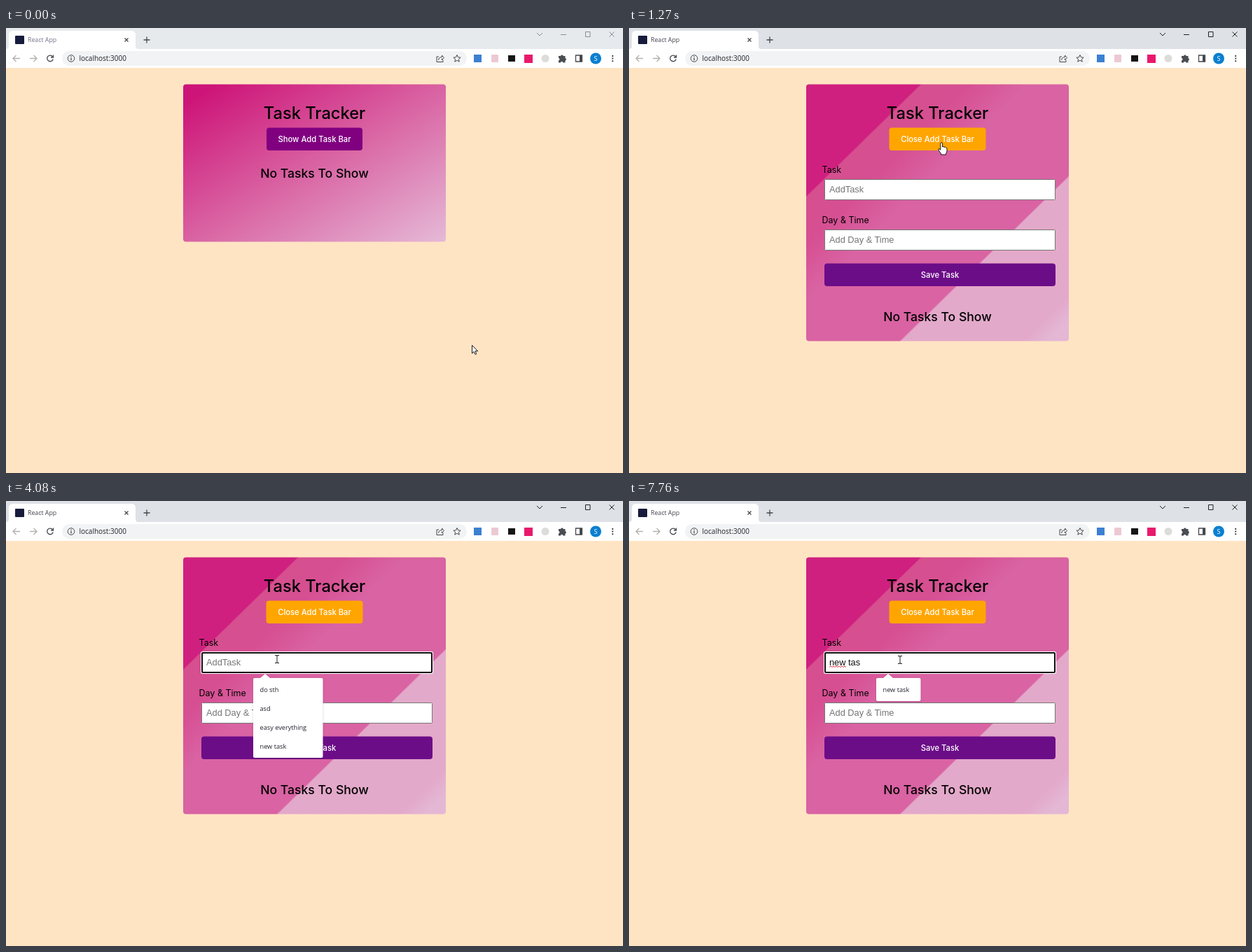
An HTML page for the animation above (8000 ms loop, 881x636 px).

```html
<!DOCTYPE html>
<html lang="en">
<head>
<meta charset="utf-8">
<title>Task Tracker</title>
<style>
html, body { margin: 0; width: 100%; height: 100%; overflow: hidden; background: #ffe4c4; }
svg { display: block; }
text { white-space: pre; }
.ui { font-family: "Open Sans", sans-serif; font-size: 9.2px; fill: #24202c; }
.app { font-family: Inter, sans-serif; font-weight: 500; text-anchor: middle; }
.label { font: 12.5px Inter, sans-serif; }
.btn { font-size: 11.25px; fill: #fff; }
.field { font: 12.8px "Liberation Sans", Arial, sans-serif; }
.hint { fill: #757575; }
.line { fill: none; stroke: #45484d; stroke-width: 1.3; }
.box { fill: #fff; stroke: #767676; }
.popup { filter: drop-shadow(0 1px 1px rgba(60, 20, 60, .25)); fill: #fff; }
.cursor { fill: #fff; stroke: #000; stroke-width: .9; stroke-linejoin: round; }
</style>
</head>
<body>
<svg width="881" height="636" viewBox="0 0 881 636">
  <defs>
    <linearGradient id="smooth" x1="0" y1="0" x2="1" y2="1">
      <stop offset=".06" stop-color="#cd1478"/>
      <stop offset=".5" stop-color="#d962a2"/>
      <stop offset="1" stop-color="#e5b9d7"/>
    </linearGradient>
    <linearGradient id="banded" x1="0" y1="0" x2="1" y2="1">
      <stop offset=".217" stop-color="#d0207f"/>
      <stop offset=".22" stop-color="#d64f8f"/>
      <stop offset=".31" stop-color="#d64f92"/>
      <stop offset=".42" stop-color="#d963a3"/>
      <stop offset=".677" stop-color="#d963a3"/>
      <stop offset=".681" stop-color="#e3a9ca"/>
      <stop offset=".91" stop-color="#e3a9ca"/>
      <stop offset=".96" stop-color="#e4b7d5"/>
    </linearGradient>
  </defs>

  <rect width="881" height="636" fill="#ffe4c4"/>

  <!-- browser window -->
  <rect id="titlebar" width="881" height="30"/>
  <path d="M0 30Q4 30 4 26V10Q4 4 10 4H179Q185 4 185 10V26Q185 30 189 30Z" fill="#fff"/>
  <rect y="30" width="881" height="27" fill="#fff"/>
  <rect x="13" y="11" width="13" height="12" rx="1" fill="#171c3c"/>
  <text id="tab" class="ui" x="31" y="20.3" style="font-size:8.8px">React App</text>
  <path class="line" d="M169.5 14.5l5 5m0-5l-5 5M196.500 17h9m-4.500-4.500v9"/>
  <path id="controls" fill="none" d="M758 7l4 4 4-4M792 9.500h8M827.500 5.500h6.500v7h-6.500ZM861.500 5.500l7 7m0-7l-7 7"/>

  <rect x="80" y="33" width="578" height="21" rx="10.500" fill="#f1f3f4"/>
  <path class="line" style="stroke:#b4b1ad" d="M20 43.500H10m4.500-4.500l-4.500 4.500 4.500 4.500M34 43.500h10m-4.500-4.500l4.500 4.500-4.500 4.500"/>
  <path class="line" d="M66.600 41A4.300 4.300 0 1 0 67.200 44.500M67.500 38.500V42H64"/>
  <circle class="line" cx="93" cy="43.500" r="4.800" style="stroke-width:1"/>
  <path class="line" d="M93 42.800v3.400M93 40.500v1.200"/>
  <text class="ui" x="104.500" y="47.200" style="font-size:10px">localhost:3000</text>
  <path class="line" style="stroke-width:1" d="M618 41H615v7.500h9V46M617.500 46q.5-4.500 5-4.500v-2.500l3 3.500-3 3.500v-2.500"/>
  <path class="line" style="stroke-width:1" d="M644 38.500l1.500 3.300 3.600.4-2.700 2.400.8 3.600-3.200-1.900-3.200 1.900.8-3.600-2.700-2.400 3.600-.4Z"/>
  <rect x="668" y="38" width="11" height="11" fill="#3c80d2"/>
  <rect x="693" y="38" width="10" height="11" rx="1" fill="#ecc9d3"/>
  <rect x="717" y="39" width="10" height="9" fill="#151515"/>
  <rect x="740" y="38" width="12" height="12" fill="#e8196c"/>
  <circle cx="770" cy="43.500" r="5.500" fill="#dcdcda"/>
  <path fill="#4a4d51" d="M789 40h3a1.900 1.900 0 0 1 3.700 0h2.800v3a1.900 1.900 0 0 1 0 3.700v2.800h-3a1.900 1.900 0 0 0-3.700 0H789v-3a1.900 1.900 0 0 0 0-3.700Z"/>
  <path class="line" d="M813.500 39h9v9h-9Z"/>
  <rect x="819" y="39" width="4" height="9" fill="#45484d"/>
  <circle cx="842" cy="43.500" r="8" fill="#0a7fd0"/>
  <text class="ui" x="842" y="46.800" text-anchor="middle" style="fill:#fff">S</text>
  <path fill="#45484d" d="M865.200 39h2v2h-2Zm0 3.600h2v2h-2Zm0 3.600h2v2h-2Z"/>

  <!-- card -->
  <rect id="card" x="253" y="80.500" width="375" rx="4"/>
  <text class="app" x="440.500" y="130" style="font-size:23.700px">Task Tracker</text>
  <g id="toggle">
    <rect id="toggleBox" y="142.500" height="32.500" rx="4"/>
    <text id="toggleText" class="app btn" x="440.500" y="163"></text>
  </g>
  <text id="empty" class="app" x="440.500" style="font-size:17.600px">No Tasks To Show</text>

  <g id="form">
    <text class="label" x="275.500" y="207.300">Task</text>
    <rect class="box" x="279.500" y="216.500" width="329" height="29" rx="1"/>
    <g id="focus">
      <rect x="278" y="215" width="332" height="32" rx="2.500" fill="#fff"/>
      <rect x="280" y="217" width="328" height="28" rx="1" fill="#fff" stroke="#101010" stroke-width="2"/>
    </g>
    <text id="typed" class="field" x="286" y="235"></text>
    <path id="spell" fill="none" stroke="#e0242c" stroke-width=".9"/>
    <rect id="caret" y="224" width="1" height="14.500"/>
    <text class="label" x="275.500" y="278.500">Day &amp; Time</text>
    <rect class="box" x="279.500" y="288.500" width="329" height="29" rx="1"/>
    <text class="field hint" x="286" y="306.500">Add Day &amp; Time</text>
    <rect x="279" y="336.500" width="330" height="32.500" rx="4" fill="#6c0d88"/>
    <text class="app btn" x="444" y="357">Save Task</text>
  </g>

  <g id="fullList">
    <path class="popup" d="M355 253h8l7-6 7 6h73.500q2 0 2 2v110q0 2-2 2H355q-2 0-2-2V255q0-2 2-2Z"/>
    <text class="ui" x="362.500" y="273.300">do sth</text>
    <text class="ui" x="362.500" y="300.300">asd</text>
    <text class="ui" x="362.500" y="327.300">easy everything</text>
    <text class="ui" x="362.500" y="354.300">new task</text>
  </g>
  <g id="shortList">
    <path class="popup" d="M355 253h8l7-6 7 6h37.500q2 0 2 2v29q0 2-2 2H355q-2 0-2-2V255q0-2 2-2Z"/>
    <text class="ui" x="362.500" y="273.300">new task</text>
  </g>

  <circle id="ripple" r="9" fill="#dfa022" opacity=".8"/>
  <g id="pointer">
    <path id="arrow" class="cursor" d="M.5.500V12L3.200 9.500 5 13.500 6.800 12.700 5 8.800H8.700Z"/>
    <path id="hand" class="cursor" d="M-1.200 1.200A1.400 1.400 0 0 1 1.600 1.200V6Q2.600 5 4 6.200 5.500 5.500 6.300 7 8 6.800 8 8.600V12Q7.600 14 6.500 15.500V17H-.5V15.500Q-2.500 13-4 10.500-4.800 8.500-3 8.700L-1.200 10.300Z"/>
    <path id="beam" fill="none" stroke="#222" d="M-3-5.500H-1Q0-5.500 0-4.500 0-5.500 1-5.500H3M0-5V5M-3 5.500H-1Q0 5.500 0 4.500 0 5.500 1 5.500H3"/>
  </g>
</svg>
<script>
const LOOP = 8000;
const OPEN = 1270, FOCUS = 2220, LIST = 2280, TYPE = 5560;
const $ = id => document.getElementById(id);
const show = (id, on) => $(id).style.display = on ? '' : 'none';

function set(id, attrs) {
  for (const key in attrs) $(id).setAttribute(key, attrs[key]);
}

// Spreads cursor positions evenly over a span of time.
const spread = (t0, t1, points) =>
  points.map(([x, y], i) => [t0 + (t1 - t0) * i / (points.length - 1), x, y]);

const path = [
  [0, 665, 453],
  ...spread(70, 740, [[640, 420], [590, 350], [520, 262], [455, 185], [400, 125],
    [376, 103], [392, 118], [420, 146], [440, 160], [446, 164]]),
  ...spread(1460, 1950, [[443, 167], [435, 176], [424, 188], [413, 201],
    [403, 213], [396, 222], [392, 228], [390, 230]]),
  [4010, 388, 228], [4080, 387, 226], [4740, 387, 226.5], [4810, 387, 227]
];
const typing = [[0, ''], [5560, 'n'], [5680, 'ne'], [5960, 'new'], [6490, 'new '],
  [6820, 'new t'], [6950, 'new ta'], [7210, 'new tas']];
const blinks = [[0, 0], [FOCUS, 1], [2740, 0], [3220, 1], [3750, 0], [4280, 1],
  [4740, 0], [5340, 1], [7760, 0]];

const latest = (list, t) => list.findLast(item => item[0] <= t);
const inside = (x, y, l, t, r, b) => x >= l && x <= r && y >= t && y <= b;

const pen = document.createElement('canvas').getContext('2d');
pen.font = '12.8px "Liberation Sans", Arial, sans-serif';

let zigzag = 'M286 237.500';
for (let i = 0; i < 12; i++) zigzag += `l2 ${i % 2 ? 1.4 : -1.4}`;
set('spell', { d: zigzag });

function drawWindow(t) {
  const active = t >= 1200;
  set('titlebar', { fill: active ? '#dee1e6' : '#e7eaed' });
  set('controls', { stroke: active ? '#202020' : '#8a8c90' });
  $('tab').style.fill = active ? '#45404c' : '#74728a';
}

function drawCard(t) {
  const open = t >= OPEN;
  const pressed = t >= 1200 && !open;
  set('card', { height: open ? 367 : 225, fill: open ? 'url(#banded)' : 'url(#smooth)' });
  set('toggleBox', {
    x: open ? 371.5 : 372, width: open ? 138 : 137, fill: open ? '#ffa500' : '#800080'
  });
  set('toggle', {
    transform: pressed ? 'translate(440.5 158.75) scale(.98) translate(-440.5 -158.75)' : ''
  });
  $('toggleText').textContent = open ? 'Close Add Task Bar' : 'Show Add Task Bar';
  set('empty', { y: open ? 418.5 : 213.5 });
  show('form', open);
}

function drawInput(t) {
  const value = latest(typing, t)[1];
  $('typed').textContent = value || 'AddTask';
  $('typed').style.fill = value ? '#111' : '#757575';
  show('focus', t >= FOCUS);
  show('spell', t >= 6490);
  show('caret', latest(blinks, t)[1]);
  set('caret', { x: Math.round(286 + pen.measureText(value).width - .3) });
  show('fullList', t >= LIST && t < TYPE);
  show('shortList', t >= TYPE);
}

function drawPointer(t) {
  const [, x, y] = latest(path, t);
  const onButton = inside(x, y, 372, 142, 509, 175);
  const onInput = t >= OPEN && inside(x, y, 279, 216, 609, 246);
  show('hand', onButton);
  show('beam', onInput);
  show('arrow', !onButton && !onInput);
  set('pointer', { transform: `translate(${x} ${y})` });
  show('ripple', t >= 1200 && t < OPEN || t >= FOCUS && t < LIST);
  set('ripple', { cx: x, cy: y - (onButton ? 1 : 0) });
}

function frame() {
  const t = performance.now() % LOOP;
  drawWindow(t);
  drawCard(t);
  drawInput(t);
  drawPointer(t);
  requestAnimationFrame(frame);
}
frame();
</script>
</body>
</html>
```
